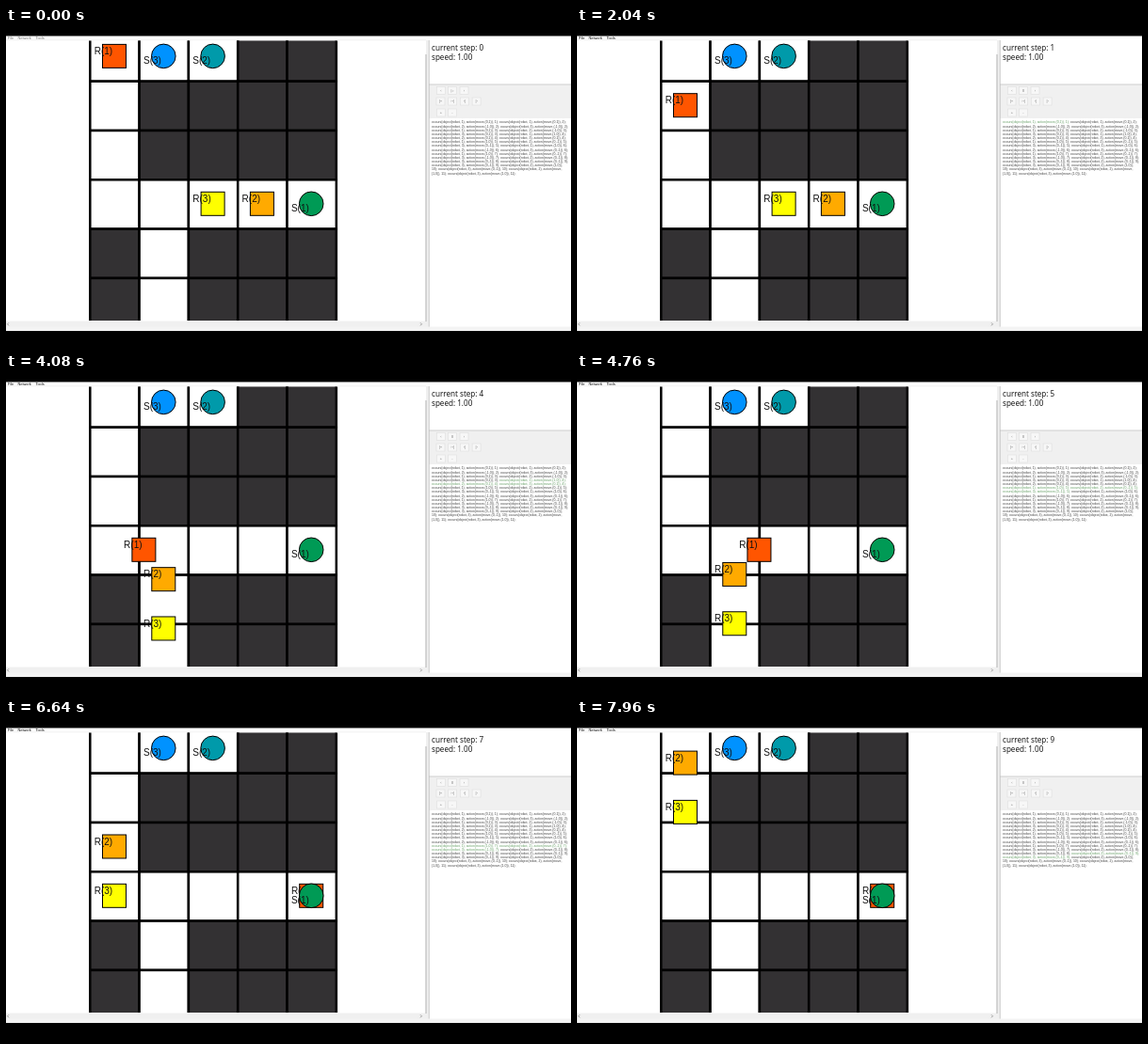
Animation, 600 px wide and 338 px high, one loop 8000 ms. Source, as an HTML page:

```html
<!DOCTYPE html>
<html lang="en">
<head>
<meta charset="utf-8">
<title>Robot grid</title>
<style>
html, body { margin: 0; width: 100%; height: 100%; overflow: hidden; background: #fff; }
svg { position: absolute; left: 0; top: 0; display: block; }
text { font-family: "Liberation Sans", Arial, sans-serif; }
.status { font: 8.1px "Noto Sans", sans-serif; fill: #1a1a1a; }
.label { font-size: 10px; fill: #111; }
.menu { font-size: 3.9px; }
.icon { font-size: 4px; fill: #777; text-anchor: middle; }
#plan {
  position: absolute; left: 451.5px; top: 98px; width: 580px;
  font: 13.9px/16.7px "Liberation Sans", Arial, sans-serif;
  color: #3c3c3c; transform: scale(.25); transform-origin: 0 0;
}
#plan .now { color: #5f9a5f; }
</style>
</head>
<body>
<svg id="stage" width="600" height="338" viewBox="0 0 600 338"></svg>
<div id="plan"></div>
<script>
const LOOP = 8000, START = 1294, TICK = 70, CELL = 52.3;
const DIRS = { U: [0, -1], D: [0, 1], L: [-1, 0], R: [1, 0], '.': [0, 0] };
const FLOOR = ['###..', '#....', '#....', '#####', '.#...', '.#...'];
const ROBOTS = [
  { cell: [0, 0], color: '#ff5500', moves: 'DDDRRRR' },
  { cell: [3, 3], color: '#ffaa00', moves: '.LLDULUUURR' },
  { cell: [2, 3], color: '#ffff00', moves: '.LDDUULUUUR' }
];
const SHELVES = [
  { cell: [4, 3], color: '#009a55' },
  { cell: [2, 0], color: '#009aaa' },
  { cell: [1, 0], color: '#0092ff' }
];

const stage = document.getElementById('stage');
const plan = document.getElementById('plan');

function add(tag, attrs, parent = stage, text = '') {
  const el = document.createElementNS('http://www.w3.org/2000/svg', tag);
  for (const key in attrs) el.setAttribute(key, attrs[key]);
  el.textContent = text;
  parent.appendChild(el);
  return el;
}
const rect = (x, y, width, height, fill, more) => add('rect', { x, y, width, height, fill, ...more });
const write = (x, y, cls, text, parent) => add('text', { x, y, class: cls }, parent, text);
const place = (el, [col, row]) =>
  el.setAttribute('transform', `translate(${115 + col * CELL} ${29.9 + row * CELL})`);

// Window chrome
rect(0, 0, 600, 338, '#fff');
rect(0, 0, 600, 8.5, '#000');
rect(0, 12.6, 446, .6, '#e6e6e6');
const menu = add('g', {});
[[2, 'File'], [12.5, 'Network'], [31.5, 'Tools']].forEach(([x, s]) => write(x, 12, 'menu', s, menu));
rect(449, 60, 151, 36, '#f0f0f0');
rect(449, 59.5, 151, 1, '#cfcfcf');
rect(0, 311.5, 449, 6.5, '#f0f0f0');
rect(446, 13, 3, 305, '#f0f0f0');
rect(445.5, 28, 1, 284, '#b0b0b0');
rect(448.8, 13, .8, 305, '#bdbdbd');
add('path', { d: 'M3 313.3l-1.5 1.5 1.5 1.5M440 313.3l1.5 1.5-1.5 1.5', fill: 'none', stroke: '#777', 'stroke-width': .7 });
rect(0, 317.5, 600, 5, '#f3f3f3');
rect(0, 322, 600, 16, '#000');

// Control buttons
function button(x, y, icon) {
  rect(x - 4.5, y - 4, 9, 8, '#f7f7f7', { stroke: '#dedede', 'stroke-width': .6 });
  return write(x, y + 1.4, 'icon', icon);
}
button(462, 66.5, '‹');
const play = button(474, 66.5, '▷');
button(486.5, 66.5, '›');
['|‹‹', '››|', '‹|', '|›'].forEach((s, i) => button(461.5 + i * 12.7, 78, s));
button(462, 90, '+');
button(474, 90, '-');

const stepText = write(452, 23.6, 'status', '');
write(452, 33.9, 'status', 'speed: 1.00');

// Grid
const clip = add('clipPath', { id: 'view' });
add('rect', { x: 0, y: 13.5, width: 445, height: 297.5 }, clip);
const grid = add('g', { 'clip-path': 'url(#view)' });
for (let row = 0; row < 6; row++) {
  for (let col = 0; col < 5; col++) {
    add('rect', {
      x: 89.3 + col * CELL, y: 4.4 + row * CELL, width: CELL, height: CELL,
      fill: FLOOR[row][col] === '#' ? '#fff' : '#333133', stroke: '#000', 'stroke-width': 2.5
    }, grid);
  }
}

function piece({ color, cell }, shape, attrs, name, labelY) {
  const g = add('g', {}, grid);
  add(shape, { ...attrs, fill: color, stroke: '#000', 'stroke-width': 1 }, g);
  write(-21.3, labelY, 'label', name, g);
  place(g, cell);
  return g;
}
ROBOTS.forEach((r, i) => {
  r.el = piece(r, 'rect', { x: -12.5, y: -12.5, width: 25, height: 25 }, `R(${i + 1})`, -1.8);
});
SHELVES.forEach((s, i) => piece(s, 'circle', { r: 12.8 }, `S(${i + 1})`, 8.2));

// Plan listing
const entries = [];
for (let step = 1; step <= 11; step++) {
  ROBOTS.forEach(({ moves }, i) => {
    const dir = moves[step - 1];
    if (!dir || dir === '.') return;
    const el = document.createElement('span');
    el.textContent = `occurs(object(robot, ${i + 1}), action(move,\u200b(${DIRS[dir]})), ${step}); `;
    plan.appendChild(el);
    entries.push({ el, step });
  });
}

// Ten moves of a tenth of a cell, then one idle tick
function progress(t) {
  const n = Math.max(0, Math.floor((t - START) / TICK));
  return Math.floor(n / 11) + (n % 11) / 10;
}

function position({ cell, moves }, p) {
  let [x, y] = cell;
  [...moves].forEach((m, i) => {
    const part = Math.min(1, Math.max(0, p - i));
    x += DIRS[m][0] * part;
    y += DIRS[m][1] * part;
  });
  return [x, y];
}

let shown = -1;
function draw(t) {
  const p = progress(t), step = Math.ceil(p);
  ROBOTS.forEach(r => place(r.el, position(r, p)));
  menu.setAttribute('opacity', Math.min(1, .55 + t / 1800));
  play.textContent = t < 1310 ? '▷' : 'II';
  if (step !== shown) {
    shown = step;
    stepText.textContent = `current step: ${step}`;
    entries.forEach(e => e.el.classList.toggle('now', e.step === step));
  }
}

const begin = performance.now();
function frame() {
  draw((performance.now() - begin) % LOOP);
  requestAnimationFrame(frame);
}
draw(0);
requestAnimationFrame(frame);
</script>
</body>
</html>
```
